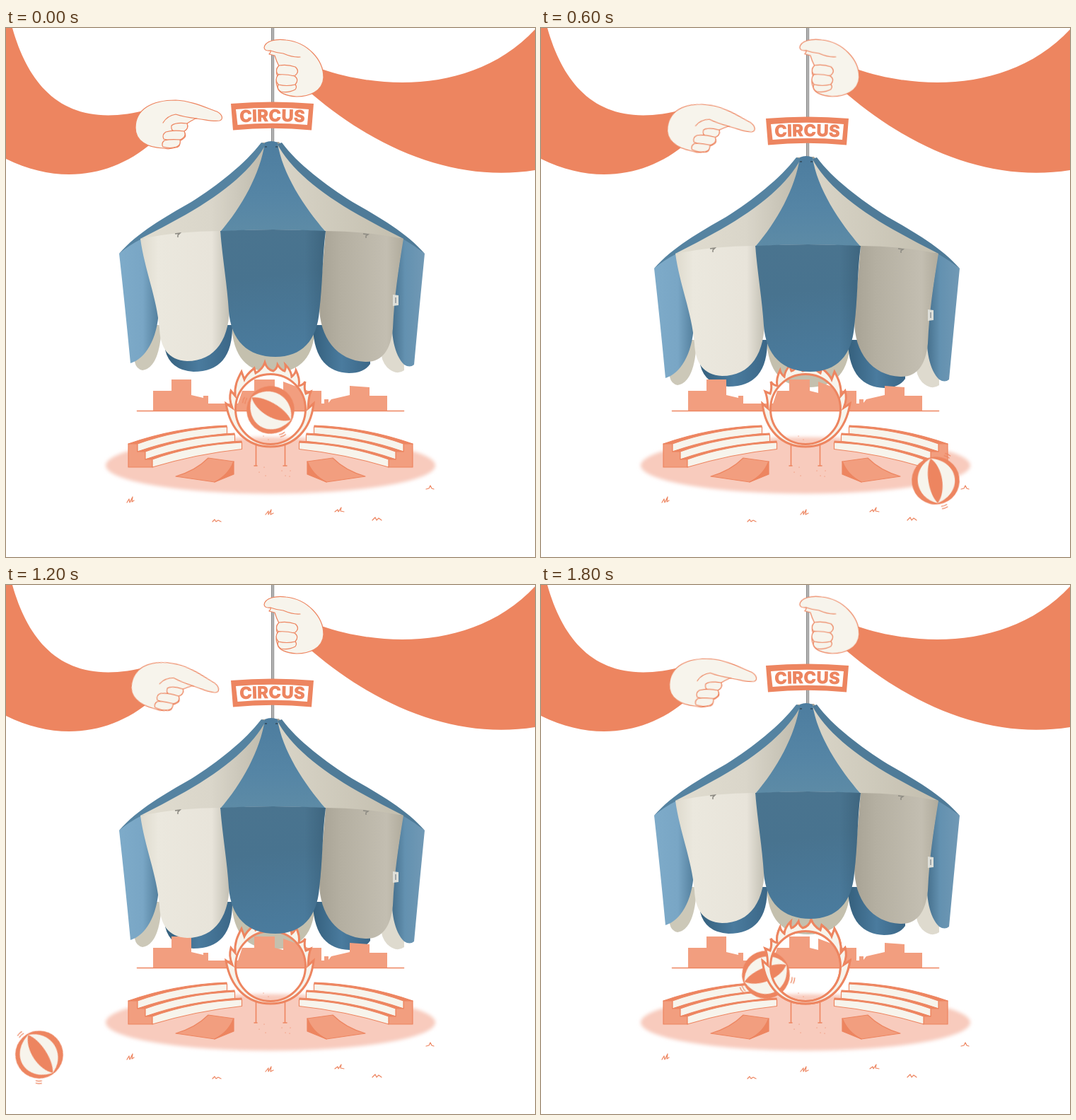
An HTML page without scripts for the animation above (2 s loop, 748 px wide and 748 px high).

```html
<!DOCTYPE html>
<html lang="en">
<head>
<meta charset="utf-8">
<title>Circus lamp</title>
<style>
  html, body { margin: 0; width: 100%; height: 100%; overflow: hidden; background: #fff; }
  svg { display: block; width: 100%; height: 100%; }

  .orange { fill: #ed8560; }
  .salmon { fill: #f29e7f; }
  .cream { fill: #f7f4ec; }
  .line { stroke: #ed8560; stroke-width: 1.2; stroke-linejoin: round; stroke-linecap: round; }
  .none { fill: none; }
  .sign { font: 900 24px Inter, "Open Sans", sans-serif; text-anchor: middle; }

  .drop { animation: drop 2s steps(5) infinite; }
  .point { transform-origin: 190px 112px; animation: point 2s steps(5) infinite; }
  .flicker { transform-origin: 374px 0; animation: flicker .4s step-end infinite; }
  .grip { animation: grip .4s step-end infinite; }
  .ball { animation: roll 2s step-end infinite; }
  .near { animation: near 2s step-end infinite; }

  @keyframes drop {
    0%, 100% { transform: translateY(0); }
    50% { transform: translateY(35px); }
  }
  @keyframes point {
    0%, 100% { transform: rotate(0deg); }
    50% { transform: rotate(13.75deg); }
  }
  @keyframes flicker {
    0%, 100% { transform: scaleX(1); }
    50% { transform: scaleX(-1); }
  }
  @keyframes grip {
    0%, 100% { transform: translate(0, 0); }
    50% { transform: translate(.8px, -.3px); }
  }
  @keyframes near { 0% { opacity: 0; } 80%, 100% { opacity: 1; } }
  @keyframes roll {
    0%, 100% { transform: translate(374px, 540px) rotate(132deg); }
    10% { transform: translate(424px, 557px) rotate(197deg); }
    20% { transform: translate(470.5px, 593.5px) rotate(262deg); }
    30% { transform: translate(558px, 640px) rotate(363deg); }
    40% { transform: translate(686px, 667.5px) rotate(439deg); }
    50% { transform: translate(-90px, 680px) rotate(90deg); }
    60% { transform: translate(47px, 664px) rotate(159deg); }
    70% { transform: translate(169.5px, 654px) rotate(261deg); }
    80% { transform: translate(243px, 609px) rotate(350deg); }
    90% { transform: translate(318px, 551px) rotate(440deg); }
  }
</style>
</head>
<body>
<svg viewBox="0 0 748 748">
  <defs>
    <linearGradient id="cord"><stop stop-color="#777"/><stop offset=".5" stop-color="#c4c4c4"/><stop offset="1" stop-color="#858585"/></linearGradient>
    <linearGradient id="blueRoof" x2="0" y2="1"><stop stop-color="#4d7d9f"/><stop offset=".6" stop-color="#5585a5"/><stop offset="1" stop-color="#5d8ba6"/></linearGradient>
    <linearGradient id="blueFront" x2=".1" y2="1"><stop stop-color="#4a748f"/><stop offset=".4" stop-color="#48738f"/><stop offset="1" stop-color="#4a7b9d"/></linearGradient>
    <linearGradient id="edge"><stop stop-color="#244459" stop-opacity="0"/><stop offset=".8" stop-color="#244459" stop-opacity="0"/><stop offset="1" stop-color="#244459" stop-opacity=".3"/></linearGradient>
    <linearGradient id="blueLeft"><stop stop-color="#7eabc9"/><stop offset=".6" stop-color="#79a6c5"/><stop offset="1" stop-color="#537f9d"/></linearGradient>
    <linearGradient id="blueRight"><stop stop-color="#456f8c"/><stop offset=".4" stop-color="#6391b0"/><stop offset="1" stop-color="#7199b5"/></linearGradient>
    <linearGradient id="blueBack"><stop stop-color="#35607d"/><stop offset=".5" stop-color="#4a7b9e"/><stop offset="1" stop-color="#3b6787"/></linearGradient>
    <linearGradient id="roofLeft"><stop stop-color="#e0dccf"/><stop offset=".55" stop-color="#dad6ca"/><stop offset="1" stop-color="#bdb9ab"/></linearGradient>
    <linearGradient id="creamFront"><stop stop-color="#dedacd"/><stop offset=".2" stop-color="#ebe8de"/><stop offset=".8" stop-color="#e8e4da"/><stop offset="1" stop-color="#c2bfb3"/></linearGradient>
    <linearGradient id="roofRight"><stop stop-color="#d9d5c8"/><stop offset="1" stop-color="#c3beae"/></linearGradient>
    <linearGradient id="greyFront"><stop stop-color="#a8a395"/><stop offset=".25" stop-color="#b4afa1"/><stop offset=".8" stop-color="#c3beb1"/><stop offset="1" stop-color="#b0ab9c"/></linearGradient>
    <filter id="soft" x="-5%" y="-20%" width="110%" height="140%"><feGaussianBlur stdDeviation="2.5"/></filter>
    <path id="arc" d="M322 134Q376.500 130.500 431 134"/>
    <path id="flap" d="M303 287Q377 283 452 287C447 325 448 360 443 400C440 442 418 465 381 465C342 465 318 442 315 400C313 365 306 325 303 287Z"/>

    <g id="seats" class="line">
      <path class="salmon" d="M173 588L186 587V598H197V609H207V621H173Z"/>
      <path class="orange" d="M173 588Q238 565 312 562V565Q243 568 186 588Z"/>
      <path id="row" class="cream" d="M186 588Q243 567.500 312.500 564V573.500Q250 580 186 599Z"/>
      <path class="orange" d="M186 599Q248 577 323 573V575Q254 579 197 599Z"/>
      <use href="#row" x="11" y="11"/>
      <path class="orange" d="M197 610Q259 588 333 584V586Q265 590 207 610Z"/>
      <use href="#row" x="21" y="22"/>
      <path class="salmon" d="M240 634Q268 626 286 608L322 613Q314 633 295 642Z"/>
      <path class="orange" d="M322 613V631L295 642Q314 633 322 613Z"/>
    </g>

    <g id="hoop" class="flicker">
      <path class="cream" fill-rule="evenodd" stroke="#ed8560" stroke-width="3"
        d="M374 592C340 592 317 568 311 531L320 537C316 527 316 521 318 513L324 520C323 506 327 497 333 486L337 497C340 490 345 486 351 481L353 488C360 484 364 479 366 473Q369 483 378 485Q383 482 384 476Q389 484 394 485Q396 481 395 476Q403 484 404 493Q409 489 410 484Q416 496 414 506Q420 505 423 500Q421 509 424 517L431 514C427 524 428 531 427 538L435 531C431 568 408 592 374 592ZM374 489.500A49.500 49.500 0 1 0 374 588.500A49.500 49.500 0 1 0 374 489.500Z"/>
    </g>
  </defs>

  <rect width="748" height="748" fill="#fff"/>

  <g class="drop">
    <path d="M183 420H220Q218 480 193 484Q184 482 182 472Z" fill="#ccc8b8"/>
    <path d="M530 420H562L563 484Q552 492 539 480Q530 470 530 455Z" fill="#dedace"/>
    <path d="M319 420H437Q436 487 378 487Q322 487 319 420Z" fill="#c4c0ae"/>
    <path d="M225 420H320Q321 486 265 486Q232 484 225 455Z" fill="url(#blueBack)"/>
    <path d="M434 420H515V475Q506 488 485 488C455 487 436 468 434 425Z" fill="url(#blueBack)"/>
  </g>

  <ellipse cx="374" cy="618.500" rx="233" ry="40" fill="#f8cbbd" filter="url(#soft)"/>
  <path class="salmon" d="M208 541V513H234V497H262V519L279 523V520H286V531H328L334 513H351V497H380V513L392 516V500L427 513H446V531H450V525H456V530L460 525L486 519V506L514 508V520H539V541Z"/>
  <path class="line" d="M185.500 541.500H562.500" style="stroke-width:1.6"/>
  <use href="#seats"/>
  <use href="#seats" transform="matrix(-1 0 0 1 748 0)"/>

  <path class="line none" d="M353.500 590V619M351 619H355M394.500 590V619M392 619H397" style="stroke-width:1.6"/>
  <path class="line none" d="M364 577h.1M371 582h.1M358 628h.1M365 621h.1M367 633h.1M390 626h.1M395 633h.1M402 626h.1M401 634h.1"/>
  <path class="line none" d="M171 671L174 666L175 671L179 663L178 670L181 668M292 698L295 695L297 698L300 696L304 698M367 688L371 683L371 688L375 681L374 688L378 686M465 684L469 681L470 684L474 678L473 683L478 684M518 696L522 692L524 696L527 693L531 696M594 652L598 651L600 647L602 651L605 652"/>

  <use href="#hoop"/>

  <g class="ball">
    <g transform="rotate(78)">
      <circle class="orange" r="33.800"/>
      <path class="cream" d="M-32 2C-22 -37 22 -37 32 2C20 33 -20 33 -32 2Z"/>
      <path class="orange" d="M-32 2C-17 -13 17 -13 32 2C17 13 -17 13 -32 2Z"/>
    </g>
    <g class="line none">
      <path transform="rotate(68)" d="M37 -4Q38 0 37 4M40.500 -4Q41.500 0 40.500 4"/>
      <path transform="rotate(-68)" d="M37 -4Q38 0 37 4M40.500 -4Q41.500 0 40.500 4"/>
    </g>
  </g>

  <g class="near"><use href="#hoop"/></g>

  <path class="orange" d="M0 0H9C34 88 88 146 202 115L207 162C150 211 75 222 0 185Z"/>
  <path class="orange" d="M446 58C540 90 668 88 748 2V201C640 218 530 176 432 93Z"/>

  <rect x="375" width="4.200" height="200" fill="url(#cord)"/>

  <g class="drop">
    <path d="M362 162L386 161L392 170L380 195H366Z" fill="#aaa598"/>
    <path d="M361 162C338 192 300 222 262 246C225 267 185 290 160 319L192 302L320 275L368 164Z" fill="#5583a1"/>
    <path d="M390 162C412 192 452 222 490 246C527 267 567 290 592 319L560 302L432 275L384 164Z" fill="#4f7b98"/>
    <path d="M160 319Q174 307 192 298L216 400C214 440 197 468 176 474Q168 390 160 319Z" fill="url(#blueLeft)"/>
    <path d="M561 298Q578 308 592 319Q584 400 577 476Q571 481 563 476C549 462 544 435 546 400Z" fill="url(#blueRight)"/>
    <path d="M368 163C350 198 310 232 254 264Q222 282 190 298L303 288Q350 238 371 166Z" fill="url(#roofLeft)"/>
    <path d="M383 163C401 198 442 232 498 264Q530 282 562 298L452 288Q405 238 380 166Z" fill="url(#roofRight)"/>
    <path d="M190 298Q246 287 303 287Q310 340 316 385C318 440 296 471 256 471C229 470 218 451 217 425C213 380 196 342 190 298Z" fill="url(#creamFront)"/>
    <path d="M452 287Q507 287 562 298C555 340 549 380 547 425C544 455 532 473 508 472C468 470 443 438 443 392Z" fill="url(#greyFront)"/>
    <path d="M366 162Q375 158 384 162C390 205 422 254 452 288Q377 282 303 288C333 254 360 205 366 162Z" fill="url(#blueRoof)"/>
    <use href="#flap" fill="url(#blueFront)"/>
    <use href="#flap" fill="url(#edge)"/>
    <path d="M239 291L246 290L243 293V296M505 291L512 292L509 294V297" fill="none" stroke="#8c8a82" stroke-width="1.500"/>
    <path d="M366 168h3M381 168h3" stroke="#39566a" stroke-width="2"/>
    <path d="M547 377L555 378V392L547 393Z" fill="#dedfd9"/>
    <path d="M551 381V389" stroke="#8c9599" stroke-width="1.500"/>

    <path class="orange" d="M318 107Q376.500 102 435 107L432 144.500Q376.500 139 321 144.500Z"/>
    <path fill="#fff" d="M325 115Q376.500 110.500 428 115L426 137Q376.500 132.500 327.500 137Z"/>
    <text class="sign orange"><textPath href="#arc" startOffset="50%">CIRCUS</textPath></text>
  </g>

  <g class="point line cream">
    <path d="M183 141C183 115 206 102 240 102C262 103 281 112 298 118C306 122 308 129 302 131C292 133 281 129 268 128Q262 131 256 135Q259 143 251 146Q257 153 250 157Q248 159 245 159Q248 168 240 169Q231 172 222 170C200 169 183 160 183 141Z"/>
    <path class="none" d="M270 128Q252 126 240 122Q228 124 222 134"/>
    <path d="M256 135Q240 133 234 138Q233 145 238 146Q247 147 252 146Q259 142 256 135Z"/>
    <path d="M252 146Q236 144 226 147Q220 151 223 157Q232 160 246 158Q256 154 252 146Z"/>
    <path d="M246 158Q232 157 224 159Q219 163 222 168Q232 171 241 168Q248 165 246 158Z"/>
  </g>

  <g class="grip line cream">
    <path d="M365 28C366 18 382 15 396 17C426 20 449 45 449 70C448 90 428 97 411 97C396 96 386 92 384 84Q380 76 384 69Q380 59 386 54Q382 46 380 39Q376 38 372 37Q375 34 374 32Q366 33 365 28Z"/>
    <path class="none" d="M374 32Q382 35 392 36Q406 42 416 41"/>
    <path d="M386 53Q380 59 384 65Q397 69 409 67Q416 61 409 55Q398 51 386 53Z"/>
    <path d="M385 66Q379 73 385 80Q397 83 409 80Q415 73 408 68Q396 65 385 66Z"/>
    <path class="none" d="M385 80Q382 87 389 90Q400 92 409 87Q412 83 409 80"/>
  </g>
</svg>
</body>
</html>
```
